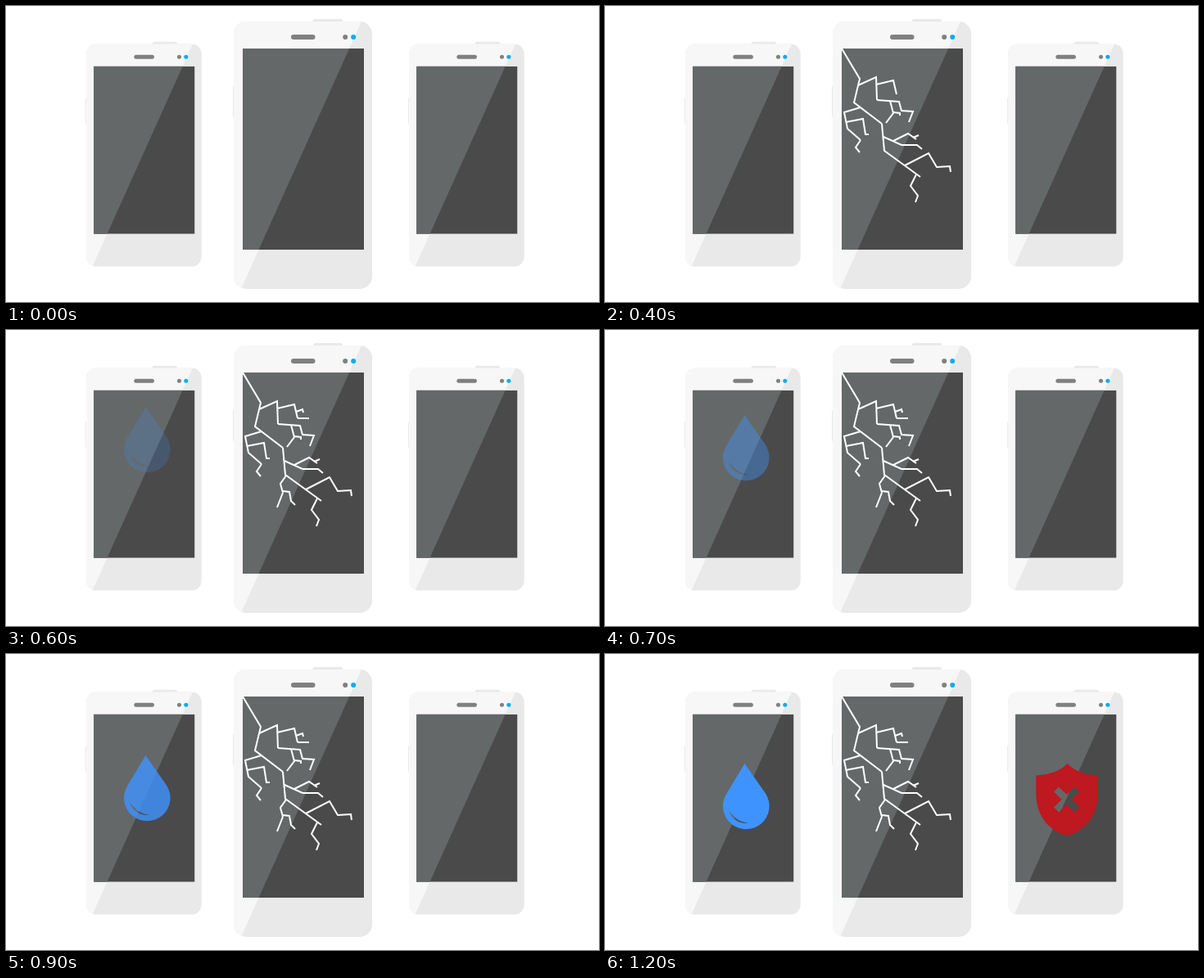
An HTML page for the animation above (1300 ms loop, 724 by 362 pixels).

```html
<!DOCTYPE html>
<html lang="en">
<head>
<meta charset="utf-8">
<title>Phone damage</title>
<style>
  html, body { margin: 0; width: 100%; height: 100%; overflow: hidden; background: #fff; }
  svg { display: block; width: 724px; height: 362px; }
</style>
</head>
<body>
<svg viewBox="0 0 724 362">
  <defs>
    <clipPath id="bodyClip"><rect x="278" y="19" width="169" height="327" rx="15"/></clipPath>
    <clipPath id="screenClip"><rect x="289" y="52" width="148" height="246"/></clipPath>
    <mask id="crossHole" maskUnits="userSpaceOnUse" x="520" y="130" width="90" height="96">
      <rect x="520" y="130" width="90" height="96" fill="#fff"/>
      <path d="M551 165.5L576.5 190.5M576 165.5L551 190.5" stroke="#000" stroke-width="8.5"/>
    </mask>
    <g id="phone">
      <path d="M375 20V18q0-2 2-2H409q2 0 2 2V20zM279 98h-1q-1 0-1 1V135q0 1 1 1h1z" fill="#e9e9e9"/>
      <g clip-path="url(#bodyClip)">
        <path d="M278 19H447V346H278z" fill="#e9e9e9"/>
        <path d="M278 19H434L287 346H278z" fill="#f7f7f7"/>
      </g>
      <g clip-path="url(#screenClip)">
        <path d="M289 52H437V298H289z" fill="#4a4a4a"/>
        <path d="M278 19H434L287 346H278z" fill="#646868"/>
      </g>
      <rect x="348" y="35" width="29.5" height="6" rx="3" fill="#808080"/>
      <circle cx="414.2" cy="38" r="3" fill="#808080"/>
      <circle cx="424.2" cy="38" r="3" fill="#00aeef"/>
    </g>
  </defs>

  <use href="#phone" transform="translate(-133.67 30.5) scale(.8333)"/>
  <use href="#phone"/>
  <use href="#phone" transform="translate(260.33 30.5) scale(.8333)"/>

  <g id="crack" fill="none" stroke="#fff" stroke-width="2" clip-path="url(#screenClip)"></g>

  <path id="drop" fill="#3f93ff" fill-rule="evenodd" opacity="0"
    d="M170.5 134L148.3 171A28.3 28.3 0 1 0 196.3 171Z
       M150 188C153 201 163 208 175 207C166 205.5 160 202 157 198C154 195 151 193 150 188Z"/>

  <path id="shield" fill="#be1820" mask="url(#crossHole)" opacity="0"
    d="M564.5 134C556 143 542 148 526.3 148.5V172C527 200 544 217 564 222C584 217 601 200 602 172V148.5C587 148 573 143 564.5 134Z"/>
</svg>
<script>
  const STEP = 100, LOOP = 1300;
  const $ = id => document.getElementById(id);

  // [step at which the branch appears, its points]
  const branches = [
    [2, "289,52 311,89 304,118 338,144"],
    [2, "309,97 331,87 332,115"],
    [3, "338,144 341,177 385,209"],
    [3, "332,115 359,117 362,128 376,129 371,142"],
    [3, "312,124 292,130 296,150 312,164"],
    [3, "340,160 362,170 381,170 387,175"],
    [4, "312,164 306,173 311,179"],
    [4, "294,142 315,138 318,157 322,157"],
    [4, "331,96 352,91 356,108"],
    [4, "348,116 352,131 343,143"],
    [4, "352,130 360,131 360,134"],
    [4, "352,165 370,156 380,163"],
    [4, "376,161 383,158"],
    [4, "366,195 395,180 405,197 421,196 422,203"],
    [4, "380,206 373,220 382,232 379,240"],
    [5, "356,108 370,108"],
    [5, "342,178 335,188 338,199"],
    [6, "354,100 362,97 363,101"],
    [6, "338,199 331,217"],
    [6, "338,197 346,198 348,209 353,214"]
  ].map(([start, points]) => {
    const line = document.createElementNS("http://www.w3.org/2000/svg", "polyline");
    line.setAttribute("points", points);
    $("crack").append(line);
    return { start, line };
  });

  function draw() {
    const step = Math.floor(performance.now() % LOOP / STEP);
    for (const { start, line } of branches) {
      line.setAttribute("visibility", step >= start ? "visible" : "hidden");
    }

    // The drop falls 10px per step while fading in
    const fall = Math.min(Math.max(step - 5, 0), 5);
    $("drop").setAttribute("opacity", fall / 5);
    $("drop").setAttribute("transform", `translate(0 ${(fall - 5) * 10})`);

    $("shield").setAttribute("opacity", step < 11 ? 0 : step < 12 ? 0.18 : 1);
    requestAnimationFrame(draw);
  }
  draw();
</script>
</body>
</html>
```
